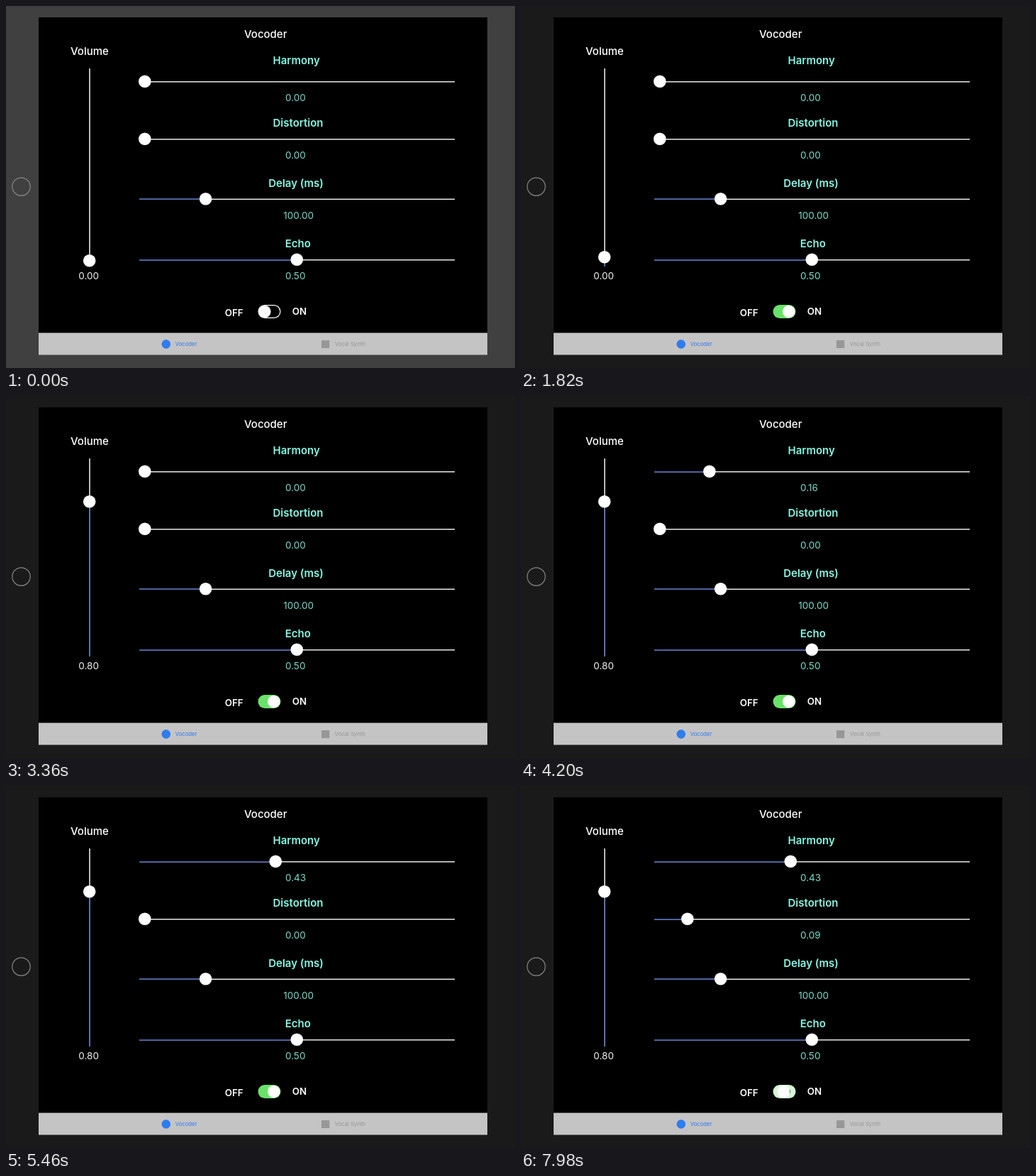
These frames come from a looping animation (718 px wide and 510 px high, 8 s). An HTML page:

```html
<!DOCTYPE html>
<html lang="en">
<head>
<meta charset="utf-8">
<title>Vocoder panel</title>
<style>
html, body { margin: 0; width: 100%; height: 100%; overflow: hidden; background: #1a1a1a; }
svg { display: block; width: 100vw; height: 100vh; font-family: Inter, "Open Sans", sans-serif; }
.title { font-size: 15px; font-weight: 500; fill: #fff; }
.name { font-size: 15px; font-weight: 600; fill: #84f8e4; }
.value { font-size: 13.5px; fill: #78dcca; }
.level { font-size: 13.5px; fill: #f2f2f2; }
.state { font-size: 13.3px; font-weight: 600; fill: #fff; }
.tab { font-size: 7.7px; }
.track { stroke: #e8e8e8; stroke-width: 1.6; }
.fill { stroke: #405fb0; stroke-width: 1.6; }
</style>
</head>
<body>
<svg id="stage" viewBox="0 0 718 510" preserveAspectRatio="none">
  <rect id="bezel" width="718" height="510"/>
  <circle cx="21.5" cy="254.5" r="12.7" fill="none" stroke="#858585" stroke-width="1.2"/>
  <rect x="46" y="16" width="633" height="445"/>
  <text class="title" x="336" y="44.5">Vocoder</text>
  <text class="title" x="91" y="68.5">Volume</text>
  <g id="sliders"></g>
  <text class="state" x="308.7" y="437">OFF</text>
  <text class="state" x="403.7" y="434.5">ON</text>
  <rect id="pill" x="355.5" y="421" width="32" height="19" rx="9.5"/>
  <rect id="hole" x="-14.8" y="-8.3" width="29.6" height="16.6" rx="8.3"/>
  <circle id="knob" cy="430.5" r="8.8" fill="#fff"/>
  <rect x="46" y="460.5" width="633" height="31" fill="#c5c4c5"/>
  <circle cx="225.8" cy="476.4" r="6.3" fill="#2f7cee"/>
  <text class="tab" x="238.8" y="479.3" fill="#2f7cee">Vocoder</text>
  <rect x="445" y="471" width="11.3" height="11" fill="#979797"/>
  <text class="tab" x="463.8" y="479.3" fill="#979797">Vocal Synth</text>
</svg>
<script>
const LOOP = 8000, STEP = 70;
const byId = id => document.getElementById(id);
const bezel = byId("bezel"), pill = byId("pill"), hole = byId("hole"), knob = byId("knob");

function add(tag, attrs, text = "") {
  const node = document.createElementNS("http://www.w3.org/2000/svg", tag);
  for (const key in attrs) node.setAttribute(key, attrs[key]);
  node.textContent = text;
  return byId("sliders").appendChild(node);
}

function horizontal(name, nameX, nameY, y, valueX = 394) {
  add("text", { class: "name", x: nameX, y: nameY }, name);
  add("line", { class: "track", x1: 188, x2: 633, y1: y + .5, y2: y + .5 });
  const fill = add("line", { class: "fill", x1: 188, y1: y + .5, y2: y + .5 });
  const thumb = add("circle", { cy: y, r: 8.8, fill: "#fff" });
  const value = add("text", { class: "value", x: valueX, y: y + 27.8 });
  return (part, shown = part) => {
    const x = 195.8 + 429 * part;
    fill.setAttribute("x2", x);
    thumb.setAttribute("cx", x);
    value.textContent = shown.toFixed(2);
  };
}

function vertical() {
  add("line", { class: "track", x1: 118, x2: 118, y1: 88, y2: 367 });
  const fill = add("line", { class: "fill", x1: 118, x2: 118, y1: 367 });
  const thumb = add("circle", { cx: 117.7, r: 8.8, fill: "#fff" });
  const value = add("text", { class: "level", x: 102.3, y: 385 });
  return (part, shown) => {
    const y = 358.7 - 262.5 * part;
    fill.setAttribute("y2", y);
    thumb.setAttribute("cy", y);
    value.textContent = shown.toFixed(2);
  };
}

const setVolume = vertical();
const setHarmony = horizontal("Harmony", 376.5, 81.7, 106.2);
const setDistortion = horizontal("Distortion", 376.5, 169.5, 187.2);
const setDelay = horizontal("Delay (ms)", 370.2, 254.5, 271.8, 391.3);
const setEcho = horizontal("Echo", 393.7, 339.5, 357.2);

function ease(t, start, end) {
  const u = Math.min(1, Math.max(0, (t - start) / (end - start)));
  return u * u * (3 - 2 * u);
}

const mix = (a, b, k) => Math.round(a + (b - a) * k);

function setSwitch(on) {
  const tint = Math.min(1, on * .4 + .6 * on * on);
  pill.setAttribute("fill", `rgb(${mix(255, 105, tint)},${mix(255, 226, tint)},${mix(255, 104, tint)})`);
  hole.setAttribute("transform", `translate(371.5 430.5) scale(${1 - on})`);
  knob.setAttribute("cx", 364.8 + 13 * on);
}

function draw(time) {
  const t = Math.floor(time % LOOP / STEP) * STEP;
  bezel.setAttribute("fill", t < 770 ? "#404040" : "#1a1a1a");
  // The volume readout changes only when its thumb is released.
  setVolume(.8 * ease(t, 1700, 3020), t < 3020 ? 0 : .8);
  setHarmony(.43 * ease(t, 3500, 5170));
  setDistortion(.091 * ease(t, 5880, 6690));
  setDelay(.2, 100);
  setEcho(.5);
  setSwitch(ease(t, 1260, 1500) - ease(t, 7850, 8090));
}

function tick(now) {
  draw(now);
  requestAnimationFrame(tick);
}
draw(0);
requestAnimationFrame(tick);
</script>
</body>
</html>
```
